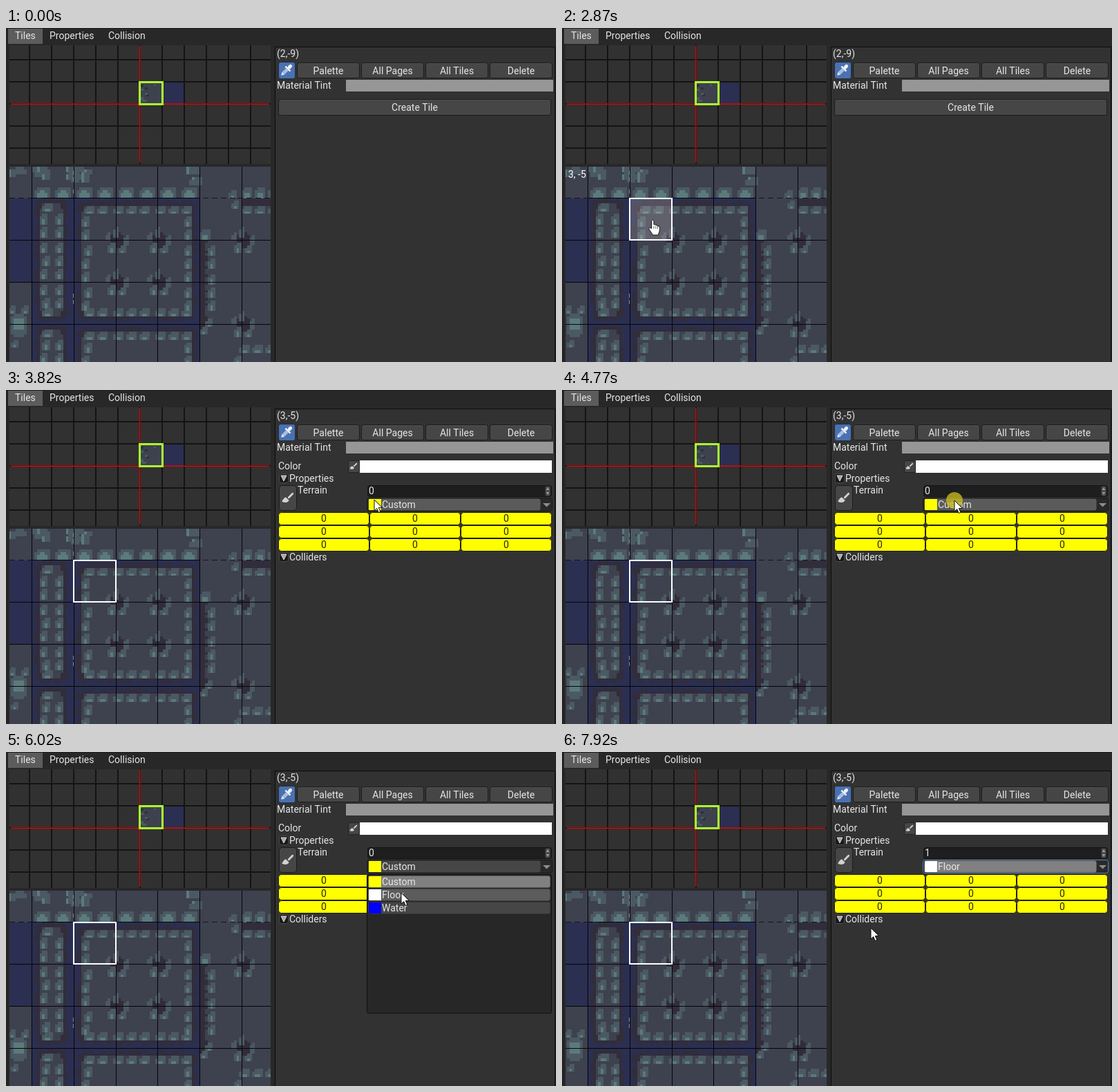
Recreate the animation shown at these times as an HTML page with a canvas. Size 796 px wide and 484 px high, loop 7990 ms.

```html
<!DOCTYPE html>
<html lang="en">
<head>
<meta charset="utf-8">
<title>Tile editor</title>
<style>
html, body { margin: 0; width: 100%; height: 100%; overflow: hidden; background: #282828; }
canvas { display: block; width: 796px; height: 484px; }
</style>
</head>
<body>
<canvas id="stage" width="796" height="484"></canvas>
<script>
const LOOP = 7990, W = 796, H = 484, TILE = 60.8;
const GROUND = '#3e414e', DARK = '#312d3b', WATER = '#2b2f51', ROCK = '#4b5963', MOSS = '#5b7a7c';
const stage = document.getElementById('stage').getContext('2d');
let g = stage;

function rect(x, y, w, h, color) {
  g.fillStyle = color;
  g.fillRect(x, y, w, h);
}

function box(x, y, w, h, r, fill, stroke) {
  g.beginPath();
  g.roundRect(x + 0.5, y + 0.5, w - 1, h - 1, r);
  g.fillStyle = fill;
  g.fill();
  if (stroke) {
    g.strokeStyle = stroke;
    g.lineWidth = 1;
    g.stroke();
  }
}

function poly(points, fill, stroke) {
  g.beginPath();
  points.forEach(([x, y]) => g.lineTo(x, y));
  g.closePath();
  g.fillStyle = fill;
  g.fill();
  if (stroke) {
    g.strokeStyle = stroke;
    g.lineWidth = 1;
    g.stroke();
  }
}

function text(str, x, middle, color = '#e6e6e6', align = 'left') {
  g.font = '14px Roboto, sans-serif';
  g.textAlign = align;
  g.fillStyle = color;
  g.fillText(str, x, middle + 5);
}

function seeded(seed) {
  return () => (seed = (seed * 16807) % 2147483647) / 2147483647;
}

// ---- pixel-art map, in art pixels of 3.8 px ----
const rand = seeded(4127);
const px = i => Math.round(37.2 + i * 3.8);
const py = j => Math.round(246.6 + j * 3.8);

function cell(i, j, w, h, color) {
  rect(px(i), py(j), px(i + w) - px(i), py(j + h) - py(j), color);
}

function rock(i, j, w, h) {
  i = Math.round(i);
  j = Math.round(j);
  cell(i + 1, j, w - 1, h, ROCK);
  cell(i, j + 1, w, h - 1, ROCK);
  if (w > 4) cell(i + 2, j + 1, w - 4, 1, MOSS);
  cell(i + 1, j + 2, w - 2, h - 2, MOSS);
}

function island(i, j, w, h) {
  const jag = () => 1 + (rand() * 2 | 0);
  cell(i - 1, j - 1, w + 2, h + 2, DARK);
  for (let k = 0; k < w; k++) {
    let p = jag();
    cell(i + k, j - p, 1, p, DARK);
    p = jag();
    cell(i + k, j + h, 1, p, DARK);
  }
  for (let k = 0; k < h; k++) {
    let p = jag();
    cell(i - p, j + k, p, 1, DARK);
    p = jag();
    cell(i + w, j + k, p, 1, DARK);
  }
  cell(i + 1, j, w - 2, h, GROUND);
  cell(i, j + 2, w, h - 4, GROUND);
  for (let k = 1; k < w - 3; k += 16 / 3) {
    rock(i + k, j, 4, 3);
    rock(i + k, j + h - 3, 4, 3);
  }
  for (let k = 4; k < h - 6; k += 16 / 3) {
    const off = rand() * 2 | 0;
    rock(i + off, j + k, 3, 4);
    rock(i + w - 3, j + k, 3, 4);
  }
}

function pit(i, j) {
  cell(i - 2, j - 2, 5, 4, DARK);
  cell(i - 1, j - 3, 3, 6, DARK);
  rock(i - 1, j - 5, 2, 4);
  rock(i - 4, j - 3, 2, 3);
  rock(i - 3, j + 1, 3, 4);
  rock(i + 1, j + 2, 3, 3);
  rock(i + 3, j - 2, 2, 4);
}

function scatter(i, j, w, h, n) {
  for (let k = 0; k < n; k++) {
    const x = i + (rand() * w | 0), y = j + (rand() * h | 0);
    cell(x, y, 3, 2, ROCK);
    if (k % 2) cell(x, y, 1, 2, MOSS);
  }
}

function drawMap() {
  rect(5, 201, 378, 283, GROUND);
  rect(5, 247, 33, 121, WATER);
  cell(0, 0, 64, 63, WATER);
  cell(64, 14, 2, 38, DARK);
  for (let j = 14; j < 52; j++) if (rand() < 0.6) cell(66, j, 1, 1, DARK);
  island(3, 2, 9, 43);
  island(3, 50, 9, 18);
  island(19, 3, 42, 42);
  island(19, 51, 42, 18);
  for (let n = 0; n < 8; n++) rock(1 + 8 * n, -4, 6, 4);
  for (let j = 18; j < 44; j += 16 / 3) rock(67, j, 3, 4);
  rock(64, 12, 4, 4);
  rock(66, 46, 3, 3);
  rock(64, 49, 3, 3);
  [[32, 16], [48, 16], [32, 32], [48, 32], [80, 16], [80, 48]].forEach(p => pit(...p));

  cell(80, 0, 12, 3, DARK);
  for (let i = 80; i < 92; i += 5) {
    rock(i, -4, 4, 4);
    rock(i, 3, 4, 3);
    rock(i - 1, 56, 4, 3);
  }
  rock(75, -3, 3, 3);
  rock(76, 1, 3, 3);
  rock(77, 60, 3, 3);
  scatter(0, -12, 5, 5, 9);
  scatter(12, -12, 9, 6, 15);
  scatter(58, -12, 5, 6, 10);
  scatter(-9, -12, 5, 3, 5);

  cell(-8, 45, 6, 7, ROCK);
  cell(-7, 44, 4, 9, ROCK);
  cell(-7, 46, 4, 4, MOSS);
  rock(-9, 41, 3, 3);
  rock(-4, 41, 3, 3);
  rock(-8, 54, 3, 3);

  for (let k = 0; k < 6; k++) rect(Math.round(37 + k * TILE), 201, 1, 283, '#050506');
  for (let k = 1; k < 4; k++) rect(5, Math.round(246.5 + k * TILE), 378, 1, '#050506');
  rect(37, 246, 244, 1, '#050506');
  for (const start of [5, 285, 335]) {
    for (let x = start; x < start + 40 && x < 383; x += 13) rect(x, 246, 8, 1, '#15151b');
  }
  for (const y of [207, 216, 234, 385, 394]) rect(97, y, 1, 6, '#8d969c');
}

function drawOverview() {
  rect(5, 25, 378, 172, '#313131');
  for (let x = 33; x < 383; x += 32) rect(x, 25, 2, 172, '#141414');
  for (let y = 45; y < 197; y += 32) rect(5, y, 378, 2, '#141414');
  rect(227, 79, 30, 31, WATER);
  rect(195, 79, 31, 31, GROUND);
  const r = seeded(77);
  for (let k = 0; k < 9; k++) rect(195 + (r() * 5 | 0) * 2, 80 + (r() * 13 | 0) * 2, 4, 3, k % 3 ? ROCK : DARK);
  rect(214, 82, 3, 2, ROCK);
  rect(7, 109.5, 374, 1.5, '#ee0000');
  rect(193, 26, 1.5, 169, '#d80000');
  g.strokeStyle = '#adff2f';
  g.lineWidth = 3;
  g.strokeRect(193.5, 78.5, 33, 32);
}

// ---- interface ----
function button(label, x, y, w, h) {
  box(x, y, w, h, 3, '#464646', '#1c1c1c');
  rect(x + 3, y + 1, w - 6, 1, '#525252');
  text(label, x + w / 2, y + h / 2, '#e6e6e6', 'center');
}

function tilted(x, y, scale, draw) {
  g.save();
  g.translate(x, y);
  g.rotate(Math.PI / 4);
  g.scale(scale, scale);
  draw();
  g.restore();
}

function dropper(x, y) {
  tilted(x, y, 1, () => {
    box(-3, -11, 6, 8, 3, '#eef2f8');
    rect(-5, -4, 10, 2.5, '#eef2f8');
    rect(-2.5, -1.5, 5, 9, '#a9bddb');
    poly([[-2.5, 7], [2.5, 7], [0, 11]], '#dfe7f2');
  });
}

function brush(x, y, scale) {
  tilted(x, y, scale, () => {
    box(-2, -12, 4, 12, 2, '#d2d2d2');
    g.fillStyle = '#d2d2d2';
    g.beginPath();
    g.moveTo(-3.5, 1);
    g.lineTo(3.5, 1);
    g.quadraticCurveTo(5, 7, -3, 10);
    g.quadraticCurveTo(-5, 5, -3.5, 1);
    g.fill();
  });
}

function foldout(label, y) {
  box(395, y - 7, 14, 14, 3, '#191919', '#4a4a4a');
  poly([[398, y - 4], [406, y - 4], [402, y + 4]], '#a8a8a8', '#d8d8d8');
  text(label, 410, y);
}

function drawBase() {
  rect(0, 0, W, H, '#282828');
  rect(0, 0, W, 1, '#1c1c1c');
  rect(0, 1, 3, H, '#232323');
  rect(3, 1, 50, 22, '#5c5c5c');
  text('Tiles', 13, 11);
  text('Properties', 63, 11);
  text('Collision', 148, 11);
  drawOverview();
  g.save();
  g.beginPath();
  g.rect(5, 201, 378, 283);
  g.clip();
  drawMap();
  g.restore();
  rect(389, 27, 406, 457, '#0c0c0c');
  rect(390, 28, 404, 456, '#323232');
  box(394, 49, 25, 25, 3, '#4a71b1', '#22303f');
  dropper(406, 61);
  ['Palette', 'All Pages', 'All Tiles', 'Delete'].forEach((s, k) => button(s, 421 + k * 93, 50, 91, 23));
  text('Material Tint', 392, 83);
  rect(492, 75, 300, 17, '#969696');
}

function option(label, swatch, y, w, fill) {
  box(524, y - 9, w, 18, 3, fill);
  rect(525, y - 8, 18, 16, swatch);
  text(label, 544, y);
}

function drawTilePanel(t, tip) {
  const picked = t >= 6090, open = t >= 4900 && !picked;
  text('Color', 394, 110);
  box(495, 102, 17, 18, 2, '#464646', '#222');
  brush(503, 111, 0.6);
  rect(512, 102, 278, 18, '#fff');
  foldout('Properties', 128);
  box(395, 138, 26, 37, 4, '#464646', '#1c1c1c');
  brush(408, 157, 0.95);
  text('Terrain', 422, 145);

  box(523, 138, 267, 17, 3, '#1e1e1e', '#151515');
  text(picked ? '1' : '0', 525, 146);
  box(780, 139, 8, 15, 2, '#4a4a4a');
  poly([[781.5, 145], [786.5, 145], [784, 141]], '#999');
  poly([[781.5, 148], [786.5, 148], [784, 152]], '#999');

  const hover = tip && !open && tip[0] > 523 && tip[1] > 156 && tip[1] < 176;
  const ring = t >= 7040 ? '#5580b8' : '#1a1a1a';
  box(522, 156, 269, 20, 3, '#292929', ring);
  option(picked ? 'Floor' : 'Custom', picked ? '#fff' : '#ff0', 166, 250, t >= 6490 ? '#808080' : hover ? '#5a5a5a' : '#464646');
  poly([[777, 164], [788, 164], [782.5, 169.5]], '#8c8c8c');

  for (let k = 0; k < 9; k++) {
    const x = 394 + (k % 3) * 132, y = 177 + (k / 3 | 0) * 19;
    box(x, y, 132, 19, 4, '#ff0', '#1c1c10');
    text('0', x + 66, y + 9, '#26260a', 'center');
  }
  foldout('Colliders', 242);

  if (open) {
    box(522, 177, 268, 202, 2, '#272727', '#101010');
    const over = tip[1] > 197 && tip[1] < 217;
    option('Custom', '#ff0', 188, 264, '#808080');
    option('Floor', '#fff', 207, 264, over ? '#5c5c5c' : '#464646');
    option('Water', '#0000ff', 226, 264, '#464646');
  }
}

// ---- pointer ----
// start, end, number of steps, path points spaced evenly in progress
const MOVES = [
  [980, 1530, 9, [[495, 495], [390, 390], [308, 300], [346, 252]]],
  [1740, 2470, 11, [[346, 252], [330, 300], [260, 366], [180, 330], [131, 278]]],
  [3220, 3950, 12, [[131, 278], [375, 210], [440, 187], [520, 165], [559, 147]]],
  [4020, 4150, 3, [[559, 147], [567, 155]]],
  [4430, 4500, 2, [[567, 155], [568, 160]]],
  [4970, 5220, 4, [[568, 160], [563, 198]]],
  [5290, 5560, 4, [[563, 198], [572, 204]]],
  [6490, 6900, 7, [[572, 204], [540, 186], [465, 174], [431, 188]]],
  [7040, 7780, 11, [[431, 188], [408, 260], [425, 350], [448, 358], [455, 325]]],
  [7850, 7920, 2, [[455, 325], [447, 255]]]
];

function along(points, p) {
  const last = points.length - 1;
  const s = Math.min(p * last, last - 1e-6), k = Math.floor(s), f = s - k;
  return [0, 1].map(d => points[k][d] + (points[k + 1][d] - points[k][d]) * f);
}

function pointer(t) {
  const move = MOVES.filter(m => t >= m[0]).pop();
  if (!move) return null;
  const [start, end, n, points] = move;
  const step = Math.floor(Math.min(1, (t - start) / (end - start)) * (n - 1) + 0.01);
  return along(points, (step + 1) / n).map(Math.round);
}

function arrow(x, y) {
  poly([[0, 0], [0, 16], [3.7, 12.6], [6.3, 18.5], [8.9, 17.4], [6.3, 11.6], [11.3, 11.3]]
    .map(([a, b]) => [x + a, y + b]), '#fff', '#111');
}

function hand(x, y) {
  g.save();
  g.translate(x - 6, y - 1);
  g.beginPath();
  g.moveTo(4.5, 13);
  g.lineTo(4.5, 2.5);
  g.quadraticCurveTo(6.2, -0.5, 8, 2.5);
  g.lineTo(8, 8);
  g.quadraticCurveTo(10, 6.8, 11, 9);
  g.quadraticCurveTo(13, 8, 14, 10);
  g.quadraticCurveTo(17, 9.5, 16.5, 13);
  g.lineTo(16, 18);
  g.lineTo(14, 23);
  g.lineTo(6.5, 23);
  g.lineTo(1, 14.5);
  g.quadraticCurveTo(0.5, 11, 4.5, 13.5);
  g.closePath();
  g.fillStyle = '#fff';
  g.strokeStyle = '#111';
  g.lineWidth = 1;
  g.fill();
  g.stroke();
  for (const k of [8, 11, 13.5]) rect(k - 0.5, 10, 0.8, 4, '#444');
  g.restore();
}

function drawHover(t) {
  if (t >= 2540 && t < 3430) {
    const next = t >= 3290;
    rect(next ? 159 : 98, 247, 60, 60, 'rgba(255,245,250,0.18)');
    text(next ? '4, -5' : '3, -5', 9, 212, '#fff');
  }
  if (t >= 2730) {
    g.strokeStyle = '#fff';
    g.lineWidth = 2;
    g.strokeRect(98, 247, 61, 60);
  }
}

function draw(t) {
  const tip = pointer(t), selected = t >= 2940;
  g.drawImage(base, 0, 0);
  text(selected ? '(3,-5)' : '(2,-9)', 392, 37);
  if (selected) drawTilePanel(t, tip);
  else button('Create Tile', 394, 103, 395, 24);
  drawHover(t);
  if (!tip) return;
  if ((t >= 4630 && t < 4970) || (t >= 5890 && t < 6020)) {
    g.fillStyle = 'rgba(205,195,30,0.75)';
    g.beginPath();
    g.arc(tip[0], tip[1], 12, 0, Math.PI * 2);
    g.fill();
  }
  if (t >= 2540 && t < 3430) hand(...tip);
  else arrow(...tip);
}

const base = document.createElement('canvas');
base.width = W;
base.height = H;
g = base.getContext('2d');
drawBase();
g = stage;

const began = performance.now();
function tick() {
  draw((performance.now() - began) % LOOP);
  requestAnimationFrame(tick);
}
tick();
</script>
</body>
</html>
```
